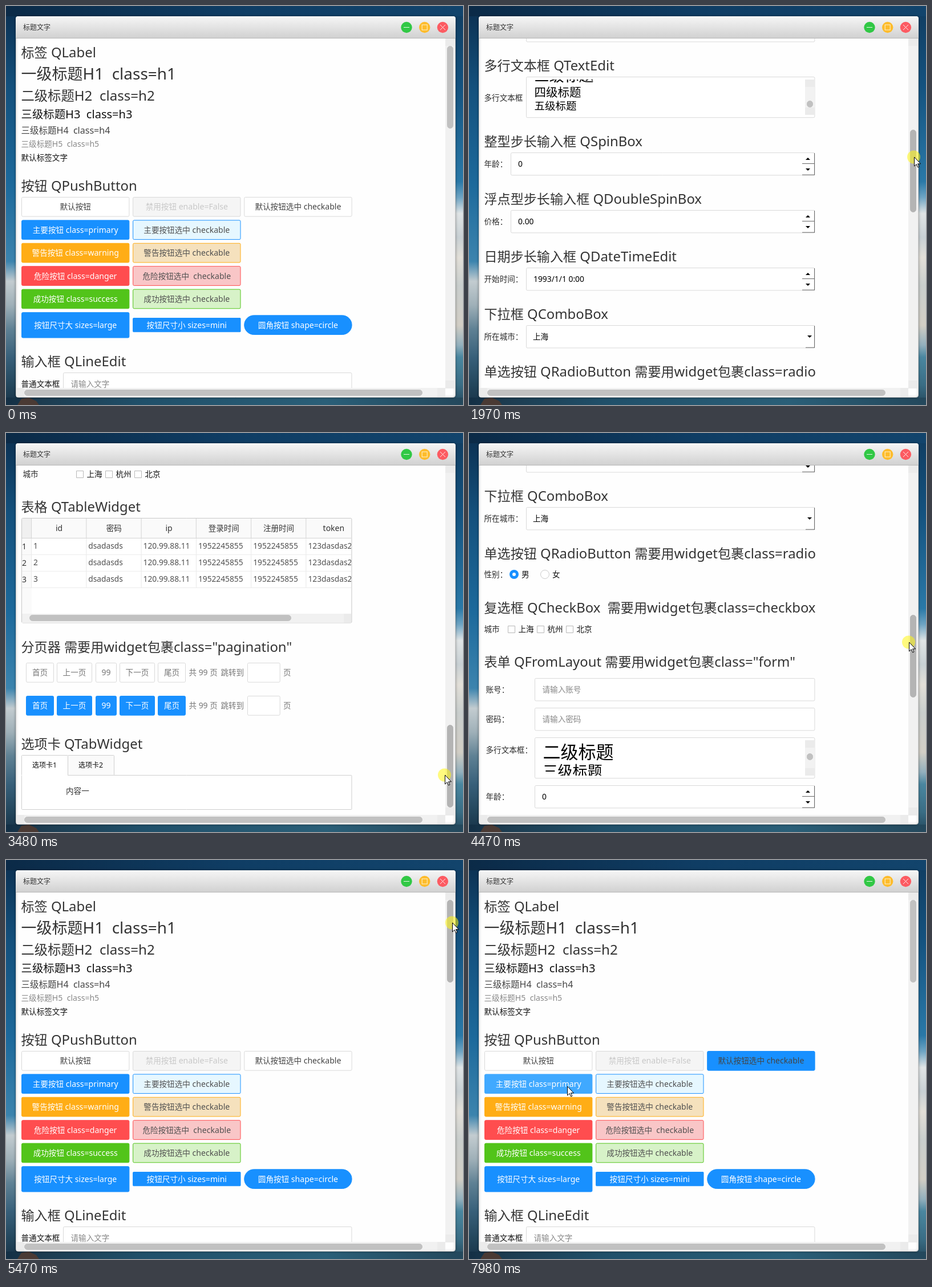
Write an HTML page with a canvas that moves like this. It is 801x700 px and loops after 8 s.

```html
<!DOCTYPE html>
<html lang="zh">
<head>
<meta charset="utf-8">
<style>
html, body { margin: 0; width: 100%; height: 100%; overflow: hidden; }
canvas { display: block; }
</style>
</head>
<body>
<canvas id="stage" width="801" height="700"></canvas>
<script>
const c = document.getElementById('stage').getContext('2d');
const LOOP = 8000, MAX_SCROLL = 1866, THUMB_TRAVEL = 442;
const FIELD_H = 40.4, BUTTON_W = 189.4, BUTTON_H = 34.7, RIGHT = 606.4;
const BLUE = '#1890ff', HOVER = '#40a9ff', LINE = '#d9d9d9', GREY = '#888', DARK = '#333', BLACK = '#111';

// [start ms, scroll, cursor x, cursor y, mouse pressed]
const steps = [
  [0, 0, -50, -50, 0], [500, 0, 610, 181, 0], [980, 0, 777, 116, 0],
  [1480, 139, 780, 151, 1], [1970, 620, 780, 265, 1], [2470, 1115, 781, 381, 1],
  [2970, 1866, 771, 596, 1], [3480, 1866, 769, 600, 1], [3980, 1652, 771, 509, 1],
  [4470, 1050, 771, 367, 1], [4970, 464, 773, 227, 1], [5470, 0, 782, 110, 1],
  [5980, 0, 304, 228, 0], [6480, 0, 104, 353, 0], [6970, 0, 470, 360, 0],
  [7480, 0, 394, 370, 0], [7980, 0, 172, 397, 0]
];

function text(s, x, y, size = 13.6, color = '#2a2a2a', align = 0) {
  const runs = s.match(/[ -~]+|[^ -~]+/g).map(str => {
    const font = /[ -~]/.test(str)
      ? `${size * 1.035}px "Noto Sans", "Open Sans", sans-serif`
      : `${size}px "Noto Sans CJK SC", "Noto Sans CJK", sans-serif`;
    c.font = font;
    return { str, font, width: c.measureText(str).width };
  });
  x -= align * runs.reduce((sum, r) => sum + r.width, 0);
  c.fillStyle = color;
  for (const r of runs) {
    c.font = r.font;
    c.fillText(r.str, x, y + size * 0.37);
    x += r.width;
  }
}

function rect(x, y, w, h, color) {
  c.fillStyle = color;
  c.fillRect(x, y, w, h);
}

function box(x, y, w, h, fill, stroke = fill, r = 2) {
  c.beginPath();
  c.roundRect(x + 0.5, y + 0.5, w - 1, h - 1, r);
  c.fillStyle = fill;
  c.strokeStyle = stroke;
  c.lineWidth = 1;
  c.fill();
  c.stroke();
}

function disc(x, y, r, fill, stroke) {
  c.beginPath();
  c.arc(x, y, r, 0, 7);
  c.fillStyle = fill;
  c.fill();
  if (stroke) { c.strokeStyle = stroke; c.lineWidth = 1; c.stroke(); }
}

function poly(points, fill, stroke) {
  c.beginPath();
  points.forEach(([x, y]) => c.lineTo(x, y));
  c.closePath();
  c.fillStyle = fill;
  c.fill();
  if (stroke) { c.strokeStyle = stroke; c.lineWidth = 1; c.stroke(); }
}

function lines(color, ...paths) {
  c.strokeStyle = color;
  c.lineWidth = 1;
  for (const [x1, y1, x2, y2] of paths) {
    c.beginPath();
    c.moveTo(x1, y1);
    c.lineTo(x2, y2);
    c.stroke();
  }
}

function gradient(x, y, w, h, stops, horizontal) {
  const g = horizontal ? c.createLinearGradient(x, 0, x + w, 0) : c.createLinearGradient(0, y, 0, y + h);
  for (const [at, color] of stops) g.addColorStop(at, color);
  rect(x, y, w, h, g);
}

function clipped(x, y, w, h, draw) {
  c.save();
  c.beginPath();
  c.rect(x, y, w, h);
  c.clip();
  draw();
  c.restore();
}

function section(y, title, draw) {
  c.save();
  c.translate(0, y);
  text(title, 26.5, 0, 23.1, DARK);
  draw();
  c.restore();
}

function button(x, y, w, h, label, fill, color, border = fill, r = 2) {
  box(x, y, w, h, fill, border, r);
  text(label, x + w / 2, y + h / 2, 13.6, color, 0.5);
}

const field = (x, y) => box(x, y, RIGHT - x, FIELD_H, '#fff', LINE);

function input(x, y, hint) {
  field(x, y);
  text(hint, x + 13.5, y + 20, 13.6, GREY);
}

const triangle = (y, d) => poly([[590, y], [598, y], [594, y + 4 * d]], '#000');

function spin(x, y, value) {
  field(x, y);
  text(value, x + 13, y + 20, 13.4, '#000');
  lines('#666', [584, y + 19.5, 606, y + 19.5], [584, y + 39.2, 606, y + 39.2], [605.5, y + 1, 605.5, y + 39.5]);
  triangle(y + 13, -1);
  triangle(y + 28, 1);
}

function combo(x, y) {
  field(x, y);
  text('上海', x + 12, y + 20, 13.6, '#000');
  lines('#666', [590, y + 39.2, 606, y + 39.2], [605.5, y + 1, 605.5, y + 39.5]);
  poly([[593, y + 18], [601, y + 18], [597, y + 22]], '#000');
}

function radios(x, y) {
  disc(x, y, 8, BLUE);
  disc(x, y, 3, '#fff');
  text('男', x + 13, y, 13.6, BLACK);
  disc(x + 54, y, 7.5, '#fff', '#ccc');
  text('女', x + 67, y, 13.6, BLACK);
}

function checks(x, y) {
  ['上海', '杭州', '北京'].forEach((city, i) => {
    box(x + 51 * i, y - 6, 13, 13, '#fff', '#b8b8b8', 0);
    text(city, x + 51 * i + 18.5, y, 13.6, BLACK);
  });
}

// rows: [text, centre y, size]
function textArea(x, y, thumbY, rows) {
  box(x, y, RIGHT - x, 72.2, '#fff', LINE);
  clipped(x, y + 5, RIGHT - x, 62, () => {
    for (const [s, dy, size] of rows) text(s, x + 14.5, y + dy, size, '#000');
    rect(589, y, 17, 72, '#f2f2f2');
    rect(589, y, 17, 18, '#ebebeb');
    rect(589, y + 54, 17, 18, '#ebebeb');
    box(592, y + thumbY - 6, 11, 12, '#c1c1c1', '#c1c1c1', 5);
  });
}

function buttons(step) {
  const hover = [13, 14].includes(step) ? step - 13 : -1, checked = step >= 15;
  const first = hover === 0 ? HOVER : null, third = hover === 1 ? HOVER : null;
  const put = (col, y, h, ...rest) => button(27 + 195.1 * col, y, BUTTON_W, h, ...rest);
  put(0, 20, BUTTON_H, '默认按钮', '#fff', first || '#444', first || LINE);
  put(1, 20, BUTTON_H, '禁用按钮 enable=False', '#f5f5f5', '#c8c8c8', LINE);
  put(2, 20, BUTTON_H, '默认按钮选中 checkable', checked ? BLUE : '#fff', third || '#444', third || (checked ? BLUE : LINE));
  [
    ['主要按钮 class=primary', BLUE, '主要按钮选中 checkable', '#e6f7ff'],
    ['警告按钮 class=warning', '#ffad16', '警告按钮选中 checkable', '#f5e1bd'],
    ['危险按钮 class=danger', '#ff4d4f', '危险按钮选中  checkable', '#f9c6c7'],
    ['成功按钮 class=success', '#52c41a', '成功按钮选中 checkable', '#d7f2c8']
  ].forEach(([label, color, onLabel, light], i) => {
    const y = 60.4 + 40.4 * i;
    put(0, y, BUTTON_H, label, step === 16 && i === 0 ? HOVER : color, '#fff');
    put(1, y, BUTTON_H, onLabel, light, '#505050', color);
  });
  put(0, 222.2, 45.3, '按钮尺寸大 sizes=large', BLUE, '#fff');
  put(1, 232, 25.2, '按钮尺寸小 sizes=mini', BLUE, '#fff', BLUE, 1);
  put(2, 227.3, BUTTON_H, '圆角按钮 shape=circle', BLUE, '#fff', BLUE, 16.8);
}

function form() {
  ['账号', '密码'].forEach((name, i) => {
    text(name + '：', 29.5, 49 + 52 * i);
    input(115, 29 + 52 * i, '请输入' + name);
  });
  text('多行文本框：', 29.5, 155);
  textArea(115, 133, 34, [['二级标题', 26, 31], ['三级标题', 59, 26]]);
  text('年龄：', 29.5, 237);
  spin(115, 217, '0');
  text('价格：', 29.5, 289);
  spin(115, 269, '0.00');
  text('开始时间：', 29.5, 341);
  spin(115, 321, '1993/1/1 0:00');
  text('所在城市：', 29.5, 393);
  combo(115, 373);
  text('性别：', 29.5, 444);
  radios(134, 444);
  text('城市', 29.5, 487);
  checks(123, 487);
}

function table() {
  box(27, 20, RIGHT - 27, 184.5, '#fff', '#c8c8c8');
  rect(28, 21, 577, 34, '#fafafa');
  rect(28, 21, 17, 34, '#f0f0f0');
  rect(28, 55, 17, 133, '#fafafa');
  clipped(28, 21, 577, 183, () => {
    const heads = ['id', '密码', 'ip', '登录时间', '注册时间', 'token'];
    heads.forEach((s, i) => {
      const x = 44.6 + 96.25 * i;
      text(s, x + 48.5, 38, 13.5, DARK, 0.5);
      lines('#d4d4d4', [x, 20, x, 55]);
      lines('#e8e8e8', [x, 55, x, 142]);
    });
    lines('#d4d4d4', [28, 55.5, 606, 55.5]);
    for (let row = 1; row <= 3; row++) {
      const y = 40 + 29 * row;
      text('' + row, 28, y + 1, 13.5, DARK);
      [row + '', 'dsadasds', '120.99.88.11', '1952245855', '1952245855', '123dasdas2'].forEach((s, i) =>
        text(s, 48 + 96.3 * i, y, 13.3, '#505050'));
      lines('#ececec', [28, y + 15.5, 606, y + 15.5]);
    }
    rect(28, 188, 578, 16, '#f1f1f1');
    rect(592, 188, 14, 16, '#ebebeb');
    box(41, 190, 459, 11, '#c1c1c1', '#c1c1c1', 5);
  });
}

function pagination() {
  const items = [[35, 49, '首页'], [89, 62, '上一页'], [157, 37, '99'], [199, 62, '下一页'], [266, 49, '尾页']];
  [28, 86].forEach((y, active) => {
    for (const [x, w, s] of items)
      button(x, y, w, BUTTON_H, s, active ? BLUE : '#fff', active ? '#fff' : '#777', active ? BLUE : LINE);
    text('共 99 页', 320.5, y + 17.5, 13.5, '#777');
    text('跳转到', 376.5, y + 17.5, 13.5, '#777');
    box(423, y, 57.7, BUTTON_H, '#fff', LINE);
    text('页', 486, y + 17.5, 13.5, '#777');
  });
}

function tabs() {
  box(27, 55, RIGHT - 27, 61, '#fff', '#cfcfcf', 1);
  box(108, 20, 82, 36, '#fafafa', '#cfcfcf', 1);
  box(27, 20, 82, 36, '#fff', '#cfcfcf', 1);
  rect(28, 54, 80, 4, '#fff');
  text('选项卡1', 67.5, 38, 12, BLACK, 0.5);
  text('选项卡2', 148.5, 38, 12, BLACK, 0.5);
  text('内容一', 105, 83, 13.6, DARK);
}

function page(step) {
  section(81, '标签 QLabel', () => {
    text('一级标题H1  class=h1', 26.5, 38, 27, DARK);
    text('二级标题H2  class=h2', 26.5, 76, 23.3, DARK);
    text('三级标题H3  class=h3', 26.5, 109, 19.4, BLACK);
    text('三级标题H4  class=h4', 26.5, 137, 15.5, '#444');
    text('三级标题H5  class=h5', 26.5, 161, 13.6, GREY);
    text('默认标签文字', 26.5, 185, 13.6, BLACK);
  });
  section(315, '按钮 QPushButton', () => buttons(step));
  section(623, '输入框 QLineEdit', () => {
    text('普通文本框', 26.5, 40, 13.6, BLACK);
    input(100, 20, '请输入文字');
  });
  section(724, '多行文本框 QTextEdit', () => {
    text('多行文本框', 26.5, 57);
    textArea(100, 20, 48, [['三级标题', -2, 26], ['四级标题', 27, 20.5], ['五级标题', 51, 18.5]]);
  });
  section(857, '整型步长输入框 QSpinBox', () => {
    text('年龄：', 26.5, 40);
    spin(73, 20, '0');
  });
  section(958, '浮点型步长输入框 QDoubleSpinBox', () => {
    text('价格：', 26.5, 40);
    spin(73, 20, '0.00');
  });
  section(1059, '日期步长输入框 QDateTimeEdit', () => {
    text('开始时间：', 26.5, 40);
    spin(100, 20, '1993/1/1 0:00');
  });
  section(1160, '下拉框 QComboBox', () => {
    text('所在城市：', 26.5, 40);
    combo(100, 20);
  });
  section(1261, '单选按钮 QRadioButton 需要用widget包裹class=radio', () => {
    text('性别：', 26.5, 37);
    radios(79, 37);
  });
  section(1356, '复选框 QCheckBox  需要用widget包裹class=checkbox', () => {
    text('城市', 26.5, 38);
    checks(68, 38);
  });
  section(1451, '表单 QFromLayout 需要用widget包裹class="form"', form);
  section(1995, '表格 QTableWidget', table);
  section(2241, '分页器 需要用widget包裹class="pagination"', pagination);
  section(2411, '选项卡 QTabWidget', tabs);
}

function desktop() {
  gradient(0, 0, 400, 700, [[0, '#0b2f50'], [0.2, '#14507c'], [0.45, '#1d6a9c'], [0.64, '#3c84ae'], [0.69, '#c3ccd0'],
    [0.75, '#9fb0b8'], [0.81, '#5f8194'], [0.88, '#38607a'], [0.95, '#23465c'], [1, '#173247']]);
  gradient(400, 0, 401, 700, [[0, '#103c60'], [0.2, '#14527f'], [0.44, '#2a79a8'], [0.48, '#6fa5c4'], [0.52, '#e0e4e5'],
    [0.58, '#c8d0d4'], [0.63, '#e2dfd8'], [0.7, '#c9cecd'], [0.8, '#d2cec5'], [0.85, '#93b0bd'], [0.88, '#4a87a0'], [0.95, '#3a6d85'], [1, '#24485c']]);
  gradient(0, 0, 801, 18, [[0, '#0b2a47'], [0.5, '#0f3d64'], [1, '#12446c']], true);
  gradient(0, 687, 801, 13, [[0, '#132f45'], [0.08, '#1d3c50'], [0.3, '#20506a'], [0.7, '#2a5f78'], [1, '#24485c']], true);
  poly([[20, 700], [27, 689], [40, 687], [53, 693], [58, 700]], '#4a3a34');
}

function frame() {
  c.save();
  c.shadowColor = 'rgba(0,0,0,.35)';
  c.shadowBlur = 4;
  box(17, 18, 771, 669, '#fefefe', '#c8c8c8', 4);
  c.restore();
  c.save();
  c.beginPath();
  c.roundRect(17, 18, 771, 669, 4);
  c.clip();
  gradient(17, 18, 771, 39, [[0, '#f6f6f6'], [1, '#d0d0d0']]);
  rect(17, 56, 771, 1, '#b8b8b8');
  c.restore();
  text('标题文字', 30, 37.5, 12, DARK);
  disc(702, 37.5, 9.7, '#31c845');
  disc(733.7, 37.5, 9.7, '#fdbc2c');
  disc(765.4, 37.5, 9.7, '#fc5b62');
  lines('#e4f8e4', [697, 37.5, 707, 37.5]);
  c.strokeStyle = '#fff3d0';
  c.strokeRect(729.2, 33, 9, 9);
  lines('#ffe8e8', [761, 33, 770, 42], [770, 33, 761, 42]);
}

function scrollBars(scroll, pressed) {
  rect(770, 57, 16, 614, '#f1f1f1');
  rect(770, 57, 16, 13, '#ebebeb');
  rect(770, 657, 16, 14, '#ebebeb');
  rect(18, 670, 752, 16, '#f1f1f1');
  rect(18, 670, 14, 16, '#ebebeb');
  rect(756, 670, 14, 16, '#ebebeb');
  const grip = pressed ? '#b4b4b4' : '#c1c1c1';
  box(773, Math.round(70 + scroll / MAX_SCROLL * THUMB_TRAVEL), 11, 145, grip, grip, 5);
  box(32, 673, 698, 11, '#c1c1c1', '#c1c1c1', 5);
}

function searchBadge(alpha) {
  c.save();
  c.globalAlpha = alpha;
  box(782, 37, 30, 29, '#cb3542', '#cb3542', 3);
  c.strokeStyle = '#f0c4c8';
  c.lineWidth = 1.5;
  c.beginPath();
  c.arc(794.5, 49.5, 6, 0, 7);
  c.moveTo(798.5, 54);
  c.lineTo(804, 60);
  c.stroke();
  c.restore();
}

function cursor(x, y, pressed) {
  if (pressed) disc(x - 0.5, y, 11.5, 'rgba(255,246,20,.55)');
  const arrow = [[0, 0], [0, 16], [3.7, 12.6], [6.2, 18], [8.4, 17], [6, 11.8], [11, 11.8]];
  poly(arrow.map(([dx, dy]) => [x + 0.5 + dx, y + dy]), '#fff', '#000');
}

function draw(now) {
  const t = now % LOOP;
  const step = steps.findLastIndex(s => s[0] <= t);
  const [, scroll, x, y, pressed] = steps[step];
  desktop();
  frame();
  clipped(18, 57, 752, 613, () => {
    c.translate(0, -scroll);
    page(step);
  });
  scrollBars(scroll, pressed);
  if (step === 12 || step === 13) searchBadge(step === 12 ? 0.6 : 1);
  cursor(x, y, pressed);
}

const start = performance.now();
function tick() {
  draw(performance.now() - start);
  requestAnimationFrame(tick);
}
tick();
</script>
</body>
</html>
```
